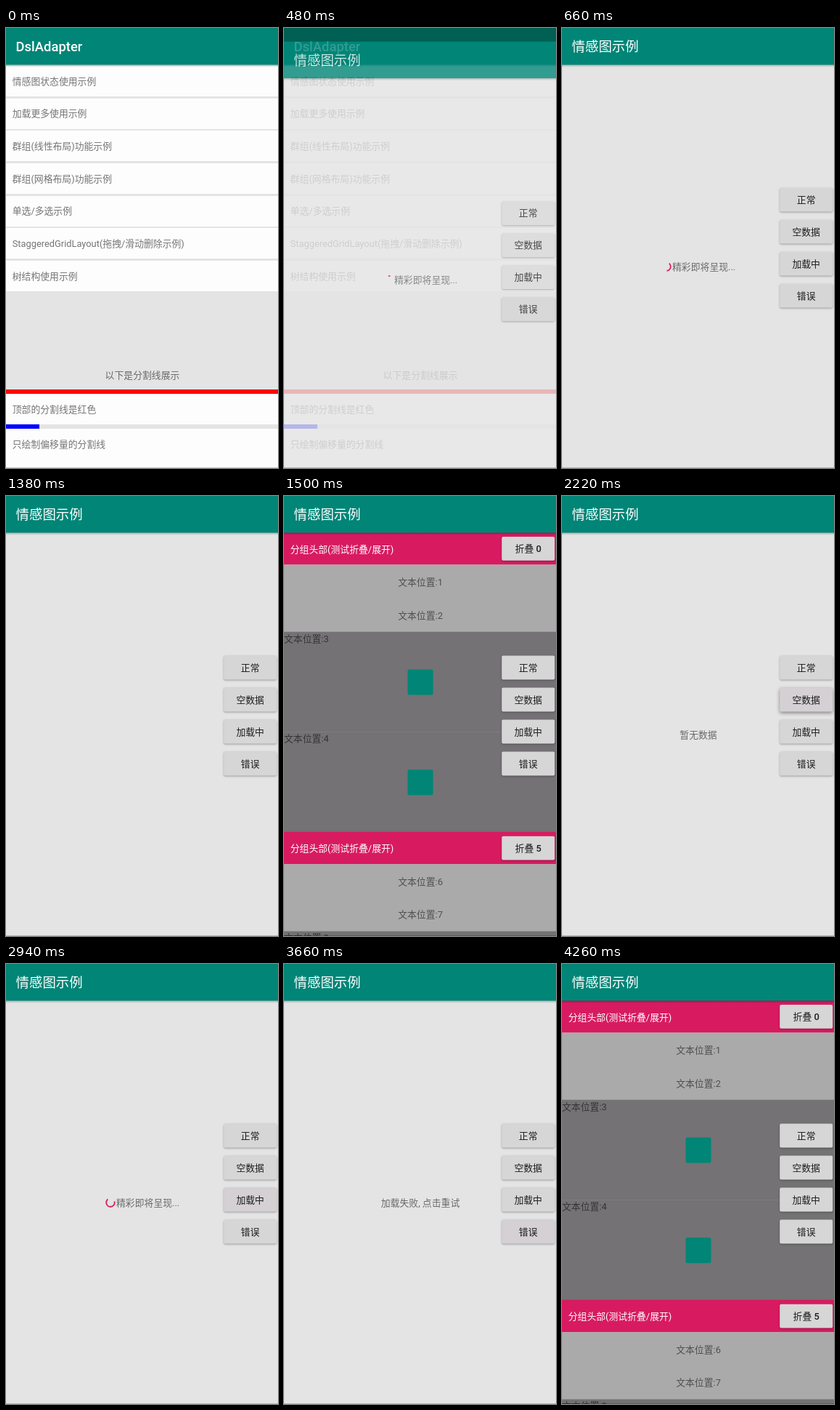
These frames come from a looping animation (375x605 px, 5.22 s). An HTML page with a canvas:

```html
<!DOCTYPE html>
<html lang="zh-CN">
<head>
<meta charset="utf-8">
<title>DslAdapter</title>
<style>
html, body { margin: 0; width: 100%; height: 100%; overflow: hidden; background: #e4e4e4; }
canvas { display: block; width: 375px; height: 605px; }
</style>
</head>
<body>
<canvas id="stage" width="375" height="605"></canvas>
<script>
const W = 375, H = 605, LOOP = 5220, STEP = 60;
const TEAL = '#008577', PINK = '#d81b60', PAPER = '#e4e4e4';
const SOFT = 'rgba(0,0,0,.54)', INK = 'rgba(0,0,0,.87)';
const FAMILY = 'Roboto, "Noto Sans CJK SC", "Noto Sans CJK", sans-serif';
const SIZE = 12.85, TITLE = 18.4;
const OPEN = 414;      // start of the page transition
const SLIDE = 53;      // distance the new page travels

const view = document.getElementById('stage').getContext('2d');
const layer = document.createElement('canvas');
layer.width = W;
layer.height = H;
const page = layer.getContext('2d');

const clamp = v => Math.min(1, Math.max(0, v));
const within = (t, a, b) => t >= a && t < b;

function rect(c, x, y, w, h, color) {
  c.fillStyle = color;
  c.fillRect(x, y, w, h);
}

// y is the middle of the line
function label(c, str, x, y, { color = SOFT, size = SIZE, weight = 400, align = 'left' } = {}) {
  c.font = `${weight} ${size}px ${FAMILY}`;
  c.textAlign = align;
  c.fillStyle = color;
  c.fillText(str, x, y + size * 0.375);
}

function toolbar(c, str, weight) {
  const g = c.createLinearGradient(0, 50, 0, 54);
  g.addColorStop(0, 'rgba(0,0,0,.26)');
  g.addColorStop(1, 'rgba(0,0,0,0)');
  rect(c, 0, 50, W, 4, g);
  rect(c, 0, 0, W, 50.5, TEAL);
  label(c, str, 13.6, 25.2, { color: '#fff', size: TITLE, weight });
}

function button(c, str, y, { weight = 400, tint = false, raised = false } = {}) {
  c.save();
  c.shadowColor = raised ? 'rgba(0,0,0,.42)' : 'rgba(0,0,0,.32)';
  c.shadowBlur = raised ? 5 : 2.5;
  c.shadowOffsetY = raised ? 2 : 1;
  c.fillStyle = tint ? '#d4d0d4' : '#d6d6d6';
  c.beginPath();
  c.roundRect(300.2, y - 16.4, 73, 32.8, 2);
  c.fill();
  c.restore();
  label(c, str, 336.7, y, { color: INK, weight, align: 'center' });
}

function home(c) {
  rect(c, 0, 0, W, H, PAPER);
  const rows = ['情感图状态使用示例', '加载更多使用示例', '群组(线性布局)功能示例',
    '群组(网格布局)功能示例', '单选/多选示例', 'StaggeredGridLayout(拖拽/滑动删除示例)', '树结构使用示例'];
  rows.forEach((str, i) => {
    const y = 73 + i * 44.65;
    rect(c, 0, Math.round(y - 21), W, 42, '#fdfdfd');
    label(c, str, 8.7, y);
  });
  label(c, '以下是分割线展示', W / 2 + 0.5, 477, { align: 'center' });
  rect(c, 0, 497, W, 6, '#f00');
  rect(c, 0, 503, W, 42, '#fdfdfd');
  label(c, '顶部的分割线是红色', 8.7, 524.5);
  rect(c, 0, 545, 46, 6, '#00f');
  rect(c, 0, 551, W, 54, '#fdfdfd');
  label(c, '只绘制偏移量的分割线', 8.7, 572.5);
  toolbar(c, 'DslAdapter', 500);
}

function group(c, y, n) {
  rect(c, 0, y, W, 44.5, PINK);
  label(c, '分组头部(测试折叠/展开)', 8.7, y + 22.7, { color: '#fff' });
  button(c, '折叠 ' + n, y + 22.4, { weight: 500 });
  rect(c, 0, y + 44.5, W, 92, '#aaa');
  for (const k of [1, 2])
    label(c, '文本位置:' + (n + k), W / 2 + 0.5, y + 22 + 45.9 * k, { align: 'center' });
  for (const k of [0, 1]) {
    const top = y + 136.5 + 137.7 * k;
    rect(c, 0, top, W, 138, '#747274');
    label(c, '文本位置:' + (n + 3 + k), 0, top + 9.3);
    c.fillStyle = TEAL;
    c.beginPath();
    c.roundRect(170.5, top + 52, 35, 35, 2);
    c.fill();
  }
}

// fast-out, slow-in curve
function ease(x) {
  let lo = 0, hi = 1, s = 0.5;
  for (let i = 0; i < 24; i++) {
    s = (lo + hi) / 2;
    const v = 1.2 * s * (1 - s) ** 2 + 0.6 * s * s * (1 - s) + s ** 3;
    if (v < x) lo = s; else hi = s;
  }
  return s * s * (3 - 2 * s);
}

function loader(c, age) {
  const p = (age % 1333) / 1333;
  const shift = p / 4 + age * 2 / 4444 - 0.25;
  const from = 0.75 * ease(clamp(p * 2 - 1)) + shift;
  const to = 0.75 * ease(clamp(p * 2)) + shift + 0.02;
  c.strokeStyle = PINK;
  c.lineWidth = 1.8;
  c.lineCap = 'square';
  c.beginPath();
  c.arc(144, 328, 5.8, from * 2 * Math.PI, to * 2 * Math.PI);
  c.stroke();
  label(c, '精彩即将呈现...', 152, 328);
}

function demo(c, t) {
  rect(c, 0, 0, W, H, PAPER);
  if (within(t, 1500, 2220) || t >= 3900) {
    group(c, 50, 0);
    group(c, 461.8, 5);
  } else if (t < 1380) {
    loader(c, Math.max(0, t - 450));
  } else if (within(t, 2220, 2580)) {
    label(c, '暂无数据', W / 2 + 0.5, 328, { align: 'center' });
  } else if (within(t, 2580, 3120)) {
    loader(c, t - 2580);
  } else if (within(t, 3120, 3900)) {
    label(c, '加载失败, 点击重试', W / 2 + 0.5, 328, { align: 'center' });
  }
  // label, tint from, tint to, raised until
  const buttons = [
    ['正常', 0, 0, 0],
    ['空数据', 2220, 2580, 2280],
    ['加载中', 2580, 3120, 2700],
    ['错误', 3120, 3900, 3300]
  ];
  buttons.forEach(([str, a, b, up], i) =>
    button(c, str, 236 + i * 44, { tint: within(t, a, b), raised: within(t, a, up) }));
  rect(c, 0, -22, W, 22.5, '#00574b');
  toolbar(c, '情感图示例', 400);
}

function draw(t) {
  const age = t - OPEN;
  const alpha = 1 - (1 - clamp(age / 200)) ** 4;
  const dy = SLIDE * (1 - clamp(age / 350)) ** 5;
  if (alpha < 1) home(view);
  if (alpha > 0) {
    page.clearRect(0, 0, W, H);
    page.save();
    page.translate(0, dy);
    if (dy > 22) {
      page.beginPath();
      page.rect(0, -22, W, H);
      page.clip();
    }
    demo(page, t);
    page.restore();
    if (alpha === 1 && dy > 22) home(view);
    view.globalAlpha = alpha;
    view.drawImage(layer, 0, 0);
    view.globalAlpha = 1;
  }
  rect(view, 0, 604, W, 1, 'rgba(0,0,0,.2)');
}

const start = performance.now();
function frame() {
  const t = (performance.now() - start) % LOOP;
  draw(Math.floor(t / STEP) * STEP);
  requestAnimationFrame(frame);
}
frame();
</script>
</body>
</html>
```
